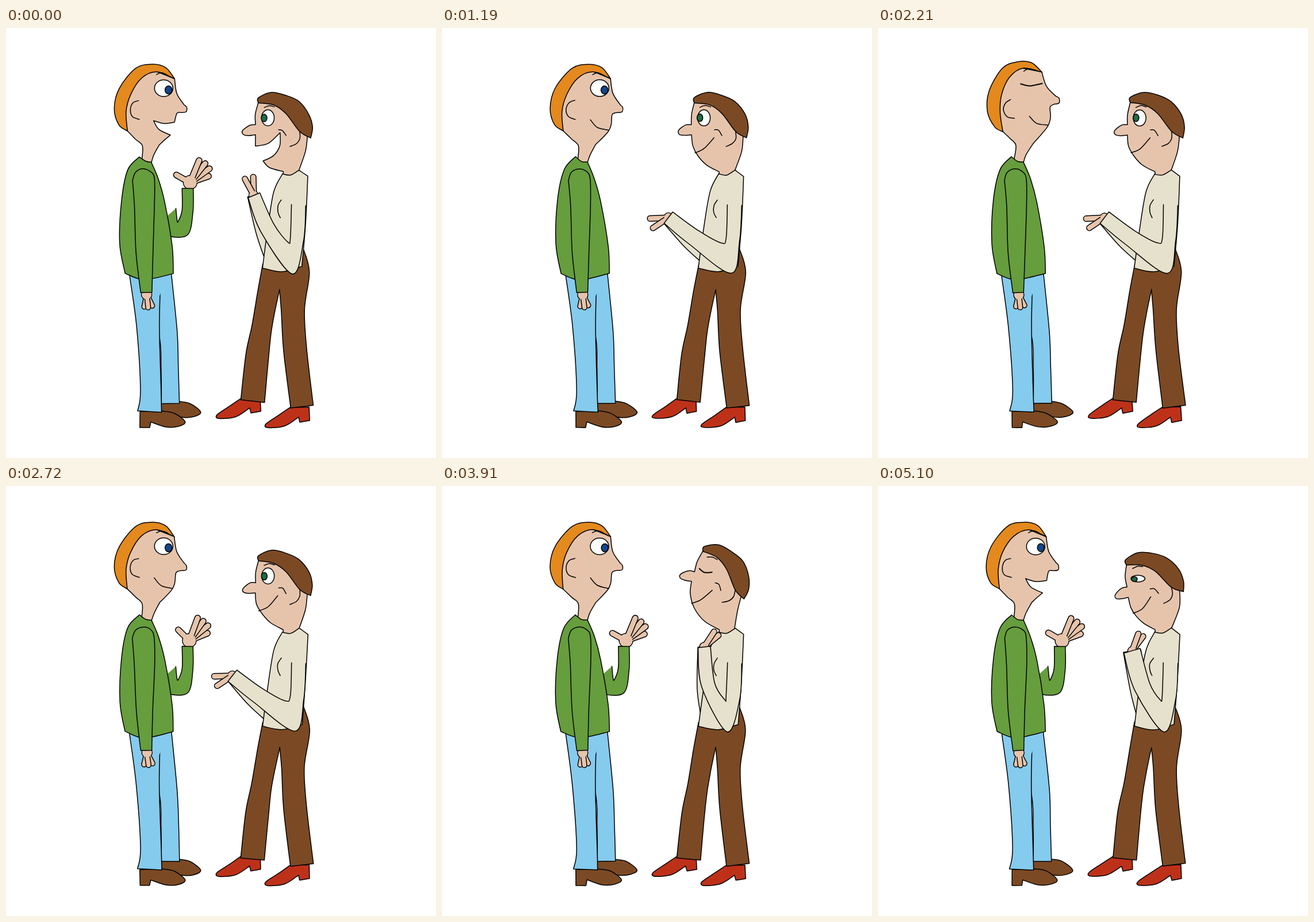
Write an HTML page with a canvas that moves like this. It is 748x748 px and loops after 5270 ms.

```html
<!DOCTYPE html>
<html lang="en">
<head>
<meta charset="utf-8">
<title>Conversation</title>
<style>
html, body { margin: 0; width: 100%; height: 100%; overflow: hidden; background: #fff; }
canvas { display: block; width: 748px; height: 748px; }
</style>
</head>
<body>
<canvas id="stage" width="748" height="748"></canvas>
<script>
const ctx = document.getElementById('stage').getContext('2d');
const STEP = 170, STEPS = 31, LINE = 1.5;
const SKIN = '#e6c4ac', GREEN = '#669d3d', BLUE = '#85cbee', BROWN = '#7b4a24',
      ORANGE = '#e3891d', CREAM = '#e6e1cc', RED = '#be3119', WHITE = '#fbfefb';
let step = 0;
let bend = null;   // head tilt in force: pivot x, y, lowest moving y, angle, rise

// Hand-drawn wobble: the same point always moves the same way within a step.
function wobble(x, y, k) {
  const s = Math.sin(x * 12.99 + y * 78.23 + step * 37.7 + k * 5.1) * 43758.5;
  return (s - Math.floor(s) - 0.5) * 0.8;
}

function place([x, y]) {
  const p = [x + wobble(x, y, 0), y + wobble(x, y, 1)];
  if (!bend) return p;
  // The tilt fades out toward the neck.
  const weight = Math.max(0, Math.min(1, (bend.base - y) / 50));
  const a = bend.angle * weight, dx = p[0] - bend.x, dy = p[1] - bend.y;
  return [bend.x + dx * Math.cos(a) - dy * Math.sin(a),
          bend.y + dx * Math.sin(a) + dy * Math.cos(a) - bend.rise * weight];
}

// Points form smooth runs; a slash marks a corner between runs.
const parse = d => d.split('/').map(run =>
  run.trim().match(/\S+ \S+/g).map(pair => pair.split(' ').map(Number)));

function trace(runs) {
  ctx.beginPath();
  let last;
  for (const run of runs) {
    const p = (last ? [last] : []).concat(run.map(place));
    if (!last) ctx.moveTo(...p[0]);
    for (let i = 1; i < p.length; i++) {
      const b = p[i - 1], c = p[i], a = p[i - 2] || b, e = p[i + 1] || c;
      ctx.bezierCurveTo(b[0] + (c[0] - a[0]) / 6, b[1] + (c[1] - a[1]) / 6,
                        c[0] - (e[0] - b[0]) / 6, c[1] - (e[1] - b[1]) / 6, c[0], c[1]);
    }
    last = p[p.length - 1];
  }
}

function paint(fill, width = LINE) {
  if (fill) { ctx.fillStyle = fill; ctx.fill(); }
  if (width) { ctx.lineWidth = width; ctx.stroke(); }
}

function shape(d, fill, width) { trace(parse(d)); paint(fill, width); }
const line = (d, width) => shape(d, null, width);

function shifted(dx, dy, d, fill) {
  ctx.save();
  ctx.translate(dx, dy);
  shape(d, fill);
  ctx.restore();
}

function oval(x, y, rx, ry, fill, width) {
  ctx.beginPath();
  ctx.ellipse(...place([x, y]), rx, ry, 0, 0, 7);
  paint(fill, width);
}

// Limb along [x, y, radius] keys, open or rounded at its start.
function tube(keys, fill, round) {
  const heading = (a, b) => Math.atan2(b[1] - a[1], b[0] - a[0]);
  const left = [], right = [];
  keys.forEach((key, i) => {
    const [x, y, r] = key, prev = keys[i - 1], next = keys[i + 1];
    const from = heading(prev || key, prev ? key : next);
    const to = next ? heading(key, next) : from;
    const a = Math.atan2(Math.sin(from) + Math.sin(to), Math.cos(from) + Math.cos(to));
    const nx = -Math.sin(a) * r, ny = Math.cos(a) * r;
    left.push([x + nx, y + ny]);
    right.unshift([x - nx, y - ny]);
  });
  if (round) {
    const [x, y, r] = keys[0], a = heading(keys[0], keys[1]) - Math.PI / 2;
    for (let i = 1; i < 5; i++) {
      const b = a - i * Math.PI / 4;
      right.push([x + r * Math.cos(b), y + r * Math.sin(b)]);
    }
  }
  trace([left, right.slice(0, 1), right.slice(1)]);
  paint(fill);
}

// Fingers are [angle, length] from the middle of the palm.
function hand(x, y, palm, r, fingers) {
  oval(x, y, palm, palm, SKIN);
  for (const [a, len] of fingers) {
    ctx.beginPath();
    ctx.moveTo(x, y);
    ctx.lineTo(...place([x + len * Math.cos(a), y + len * Math.sin(a)]));
    paint(null, 2 * r + LINE);
    ctx.strokeStyle = SKIN;
    paint(null, 2 * r - LINE);
    ctx.strokeStyle = '#000';
  }
  oval(x, y, palm - LINE / 2, palm - LINE / 2, SKIN, 0);
}

function drawRaisedArm() {
  const wave = step < 6 ? Math.min(1, step / 3) : step < 22 && step % 2 === 0 ? 0.6 : 0;
  const fingers = [[-2.63 + 0.45 * wave, 27]];
  for (let i = 3; i >= 0; i--) fingers.push([-1.18 + 0.28 * i - 0.08 * wave, i === 3 ? 34 : 42]);
  hand(320 - 2 * wave, 269, 12, 5, fingers);
  tube([[276, 331, 26], [291, 348, 16], [308, 348, 14], [316, 318, 9.5], [316, 279, 9.5]], GREEN);
  if (step === 19) for (let i = 0; i < 3; i++) oval(359 - 9 * i, 296 + 13 * i * (i - 1), 2, 4, SKIN, 1);
}

const manMouths = {
  smile: '296 151 294 168 288 181 267 203',
  laugh: '297 148 293 164/275 166 257 161/266 176 286 186/277 194 267 203',
  talk: '300 153 297 164 287 170/278 170 275 180 280 186/279 195 267 203'
};

function manMouth() {
  if (step < 2 || step > 26) return 'laugh';
  return step > 15 && step < 22 && step % 2 ? 'talk' : 'smile';
}

function drawManHead() {
  const nodding = step > 7 && step < 16, mouth = manMouth();
  const lift = nodding ? 0.8 + 0.6 * Math.sin((step - 8) * 1.3) : 0;
  bend = { x: 250, y: 130, base: 215, angle: -0.19 * lift, rise: 5 * lift };
  shape('293 88 297 114 310 134/314 138 313 146 304 147/' + manMouths[mouth] +
        '/257 222 252 238/236 230/237 205 225 193 211 179/200 150/214 95/248 70/293 88', SKIN);
  shape('293 88 278 69 255 63 226 70 197 105 188 140 196 168 211 179/209 145 217 115 236 87 262 76 293 88', ORANGE);
  line('231 126 221 130 216 142 220 154 232 159');
  line('262 81 271 78 281 82');
  if (mouth === 'smile') line('258 160 270 173 290 178');
  if (nodding) line('253 102 268 108 290 108', 2);
  else {
    oval(274, 105, 16, 14.5, WHITE);
    oval(283, 107.5, 6, 7, '#12468c');
  }
  bend = null;
}

function drawMan() {
  const shoe = '233 667/233 695/250 695/252 685/278 694 300 693 312 685 293 670 271 666/233 667';
  if (step < 6 || step > 15) drawRaisedArm();
  shifted(27, -17, shoe, BROWN);
  shape(shoe, BROWN);
  tube([[262, 430, 26], [282, 530, 16], [285, 590, 15], [286, 653, 16]], BLUE);
  tube([[242, 430, 27], [247, 520, 20], [252, 630, 18], [250, 667, 21]], BLUE);
  shape('245 430/282 430/266 469', BLUE, 0);
  drawManHead();
  shape('232 224 212 247 201 300 198 375 207 427/240 438 291 427/289 380 276 303 265 262 253 233/243 232 232 224', GREEN);
  hand(245, 464, 9, 4.3, [[1.8, 21], [1.1, 21], [1.45, 22]]);
  tube([[239, 264, 19], [241, 310, 17.5], [241, 390, 14.5], [244, 460, 9.5]], GREEN, true);
}

// Forearm middle and cuff as x, y, radius; then hand turn, finger spread and head tilt.
const UP = [455, 348, 13, 431, 291, 11, 4.45, 0.24, 0],
      OUT = [438, 364, 14, 394, 330, 12.5, 2.83, 0.27, 0],
      CHEST = [463, 346, 12, 456, 280, 11, 5.45, 0.16, 0.27],
      NEAR = [460, 350, 14, 442, 287, 15, 5.21, 0.15, -0.15];
const acts = [[0, UP], [3, OUT], [21, OUT], [23, CHEST], [27, CHEST], [30, NEAR], [STEPS, UP]];

function womanPose() {
  const i = acts.findIndex(act => act[0] > step);
  const [t0, a] = acts[i - 1], [t1, b] = acts[i];
  return a.map((v, j) => v + (b[j] - v) * (step - t0) / (t1 - t0));
}

const womanMouths = {
  smile: '436 205 445 222 460 238 482 250',
  laugh: '434 205/456 201 477 182/476 205 465 222 447 231/458 243 482 250',
  pucker: '434 194/429 199 432 206 438 208/434 214 437 222 443 224/458 240 482 250'
};

function drawWomanHead(tilt) {
  const mouth = step > 6 ? 'smile' : step % 2 ? 'pucker' : 'laugh';
  bend = { x: 485, y: 180, base: 250, angle: tilt, rise: Math.max(0, tilt) * 22 };
  shape('439 130 434 150 434 168/424 169 412 178 413 185 422 187 434 186/' + womanMouths[mouth] +
        '/482 260/510 258/510 247/521 215 524 189/520 150/480 122/439 130', SKIN);
  shape('439 130 439 121 462 112 487 117 510 128 527 150 533 172 530 191/511 180 487 149 465 134 439 130', BROWN);
  line('449 138 458 135 467 137');
  line('511 180 511 192 505 201 494 206');
  if (mouth === 'smile') line('440 217 456 210 473 191');
  if (mouth !== 'pucker') line('474 177 481 178 487 187');
  if (tilt > 0.1 || step > 1 && step < 5) line('441 161 451 165 464 161', 2);
  else {
    const open = tilt < -0.1 ? 0.42 : 1;
    oval(455.5, 156.5, 11 + 2 * (1 - open), 14 * open, WHITE);
    oval(449, 156.5, 5, 6.5 * Math.sqrt(open), '#1d6b45');
  }
  bend = null;
}

function drawWoman() {
  const [mx, my, mr, cx, cy, cr, turn, spread, tilt] = womanPose();
  const mid = [mx, my, mr], cuff = [cx, cy, cr];
  const shoe = '494 660 475 673 452 689 456 695 485 692 509 677/511 686/528 683/527 659/494 660';
  shifted(-85, -16, shoe, RED);
  shape(shoe, RED);
  tube([[466, 415, 20], [456, 460, 18.5], [445, 520, 17.5], [437, 570, 20], [429, 649, 20.5]], BROWN);
  tube([[497, 385, 20], [501, 425, 27], [499, 490, 20], [503, 560, 20], [515, 659, 20]], BROWN);
  shape('452 421/518 421/475 455', BROWN, 0);
  tube([[462, 402, 11], [mx - 7, my + 6, mr], cuff], CREAM);
  drawWomanHead(tilt);
  shape('481 254 466 285 455 350 446 418/480 424 515 415/521 340 525 258/510 247/495 256 481 254', CREAM);
  line('479 299 473 309 473 321 477 330');
  hand(cx, cy, 8, 4.8, [[turn + spread, 32], [turn - spread, 32]]);
  tube([[509, 308, 12.5], [506, 368, 12], [494, 400, 28], mid, cuff], CREAM);
}

function frame(now) {
  step = Math.floor(now / STEP) % STEPS;
  ctx.fillStyle = '#fff';
  ctx.fillRect(0, 0, 748, 748);
  ctx.strokeStyle = '#000';
  ctx.lineJoin = ctx.lineCap = 'round';
  drawMan();
  drawWoman();
  requestAnimationFrame(() => frame(performance.now() - start));
}
const start = performance.now();
frame(0);
</script>
</body>
</html>
```
